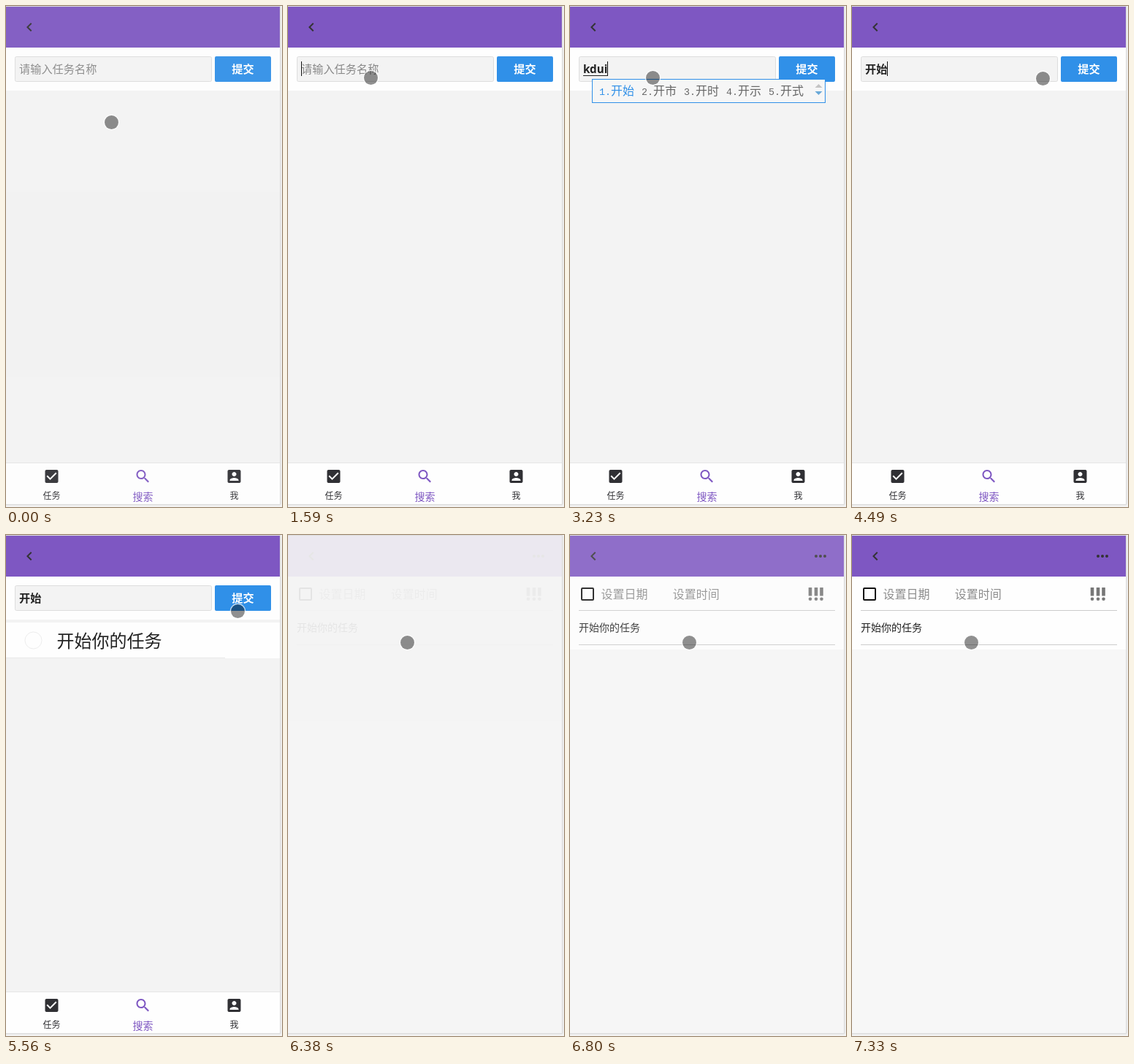
An HTML page for the animation above (7.99 s loop, 378 by 687 pixels).

```html
<!DOCTYPE html>
<html lang="zh">
<head>
<meta charset="utf-8">
<style>
  html, body { margin: 0; width: 100%; height: 100%; overflow: hidden; background: #f5f5f5; }
  svg { display: block; font: 15.2px "Open Sans", "Noto Sans CJK SC", "Noto Sans CJK", sans-serif; }
  .b { font-weight: bold; }
  .mid { text-anchor: middle; }
  .thin { font-weight: 300; }
  .line { stroke: #ccc; }
  .half { font: 13.33px "Liberation Mono", monospace; }
</style>
</head>
<body>
<svg width="378" height="687" viewBox="0 0 378 687">
  <defs>
    <filter id="soft" x="-5%" y="-5%" width="110%" height="110%"><feGaussianBlur stdDeviation="1.3"/></filter>
    <path id="back" d="M35.41 24.41L34 23l-6 6 6 6 1.41-1.41L30.83 29z" fill="#333"/>
  </defs>
  <rect x="-4" y="1" width="380" height="683" fill="#ccc" filter="url(#soft)"/>
  <path d="M0 .5H376M375.5 0V684M0 683.5H376" stroke="#dedede"/>
  <rect y="1" width="375" height="682" fill="#f4f4f4"/>

  <g id="search">
    <rect y="1" width="375" height="682" fill="#f3f3f3"/>
    <rect y="1" width="375" height="56" fill="#7e57c2"/>
    <use href="#back"/>
    <rect y="57" width="375" height="59" fill="#fefefe"/>
    <rect x="12.5" y="69.5" width="269" height="34" rx="2" fill="#f3f3f3" stroke="#ddd"/>
    <rect x="286" y="69" width="77" height="35" rx="2" fill="#3090e8"/>
    <text x="324.5" y="92.3" class="b mid" fill="#fff">提交</text>
    <text id="hint" x="18" y="92.3" fill="#888">请输入任务名称</text>
    <text id="typed" x="18" y="92.3" class="b" fill="#222"></text>
    <path id="under" stroke="#222"/>
    <path id="caret" stroke="#111"/>
    <g id="item">
      <rect y="120" width="375" height="49" fill="#fefefe"/>
      <path d="M0 168.5H300" stroke="#e9e9e9"/>
      <circle cx="37.5" cy="144.5" r="11.5" fill="none" stroke="#ededed"/>
      <text x="69.5" y="153.5" font-size="24" class="thin" fill="#222">开始你的任务</text>
    </g>
    <g id="popup">
      <rect id="frame" x="30.5" y="100.5" height="32" fill="#f6f6f6" stroke="#3090e8"/>
      <g id="words" font-size="16"></g>
      <g id="arrows"><path d="M-5 112l5-5 5 5z" fill="#c4c4c4"/><path d="M-5 117l5 5 5-5z" fill="#6aa9d8"/></g>
    </g>
    <rect y="626" width="375" height="1" fill="#e6e6e6"/>
    <rect y="627" width="375" height="56" fill="#fefefe"/>
    <g fill="#303034" class="mid" font-size="12">
      <path transform="translate(50.5 633)" d="M19 3H5c-1.11 0-2 .9-2 2v14c0 1.1.89 2 2 2h14c1.11 0 2-.9 2-2V5c0-1.1-.89-2-2-2zm-9 14l-5-5 1.41-1.41L10 14.17l7.59-7.59L19 8l-9 9z"/>
      <text x="62.5" y="676">任务</text>
      <path transform="translate(300.5 633)" d="M3 5v14c0 1.1.89 2 2 2h14c1.1 0 2-.9 2-2V5c0-1.1-.9-2-2-2H5c-1.11 0-2 .9-2 2zm12 4c0 1.66-1.34 3-3 3s-3-1.34-3-3 1.34-3 3-3 3 1.34 3 3zm-9 8c0-2 4-3.1 6-3.1s6 1.1 6 3.1v1H6v-1z"/>
      <text x="312.5" y="676">我</text>
    </g>
    <g fill="#7e57c2" class="mid" font-size="14">
      <path transform="translate(175.5 633)" d="M15.5 14h-.79l-.28-.27C15.41 12.59 16 11.11 16 9.5 16 5.91 13.09 3 9.5 3S3 5.91 3 9.5 5.91 16 9.5 16c1.61 0 3.09-.59 4.23-1.57l.27.28v.79l5 4.99L20.49 19l-4.99-5zm-6 0C7.01 14 5 11.99 5 9.5S7.01 5 9.5 5 14 7.01 14 9.5 11.99 14 9.5 14z"/>
      <text x="187.5" y="678.3">搜索</text>
    </g>
  </g>

  <g id="detail">
    <rect y="1" width="375" height="682" fill="#f7f7f7"/>
    <rect y="1" width="375" height="56" fill="#7e57c2"/>
    <use href="#back"/>
    <g fill="#333"><circle cx="337" cy="29" r="2"/><circle cx="343" cy="29" r="2"/><circle cx="349" cy="29" r="2"/></g>
    <rect y="57" width="375" height="100" fill="#fefefe"/>
    <rect x="16" y="73" width="16" height="16" rx="1" fill="none" stroke="#111" stroke-width="2"/>
    <g font-size="16" class="thin" fill="#8c8c8c">
      <text x="42.5" y="87">设置日期</text>
      <text x="140.8" y="87">设置时间</text>
    </g>
    <g fill="#777" id="marks"></g>
    <path class="line" d="M12 103.5H363M12 150.5H363"/>
    <text x="12" y="132.3" font-size="14" fill="#222">开始你的任务</text>
  </g>

  <g id="pointer">
    <circle r="10" fill="none" stroke="#fff" stroke-opacity=".7" stroke-width="1.5"/>
    <circle r="9.5" fill="#000" fill-opacity=".43"/>
  </g>
</svg>
<script>
const LOOP = 7990;
const $ = id => document.getElementById(id);
const show = (id, on) => $(id).setAttribute('display', on ? 'inline' : 'none');

// Each track lists [start ms, value...]; a value holds until the next start.
const pointer = [[0, 144, 159], [150, 113, 115], [300, 113, 107], [430, 113, 98],
  [4340, 164, 98], [4490, 261, 99], [4640, 310, 99], [4760, 325, 96], [4880, 329, 93],
  [5560, 317, 104], [5710, 243, 150], [5860, 200, 150], [5980, 166, 147], [6130, 163, 147]];
const searchFade = [[0, .94], [300, .97], [430, 1], [6380, 0]];
const detailFade = [[0, 0], [6380, .065], [6520, .3], [6640, .587], [6800, .85], [6940, .96], [7330, 1]];
const caret = [[0, 0], [570, 1], [1130, 0], [1590, 1], [2180, 0], [2580, 1], [3780, 0], [4340, 1], [4760, 0]];
const phrases = '开始 开市 开时 开示 开式';
const typing = [[0, '', ''], [2830, 'k', '可 看 开 快 k歌'], [2980, 'kd', '开 凯 慨 楷 揩'],
  [3105, 'kdu', phrases], [3230, 'kdui', phrases], [3380, '开始', '']];

const at = (track, t) => track.findLast(k => k[0] <= t).slice(1);

$('marks').innerHTML = [329, 337, 344.5].map(x =>
  `<rect x="${x - 2.3}" y="72" width="4.6" height="11.5" rx=".5"/><circle cx="${x}" cy="87.7" r="2.3"/>`).join('');

let shown = null;
function setText(text, list) {
  if (shown === text) return;
  shown = text;
  $('typed').textContent = text;
  const end = 18 + Math.round($('typed').getComputedTextLength());
  $('caret').setAttribute('d', `M${end + .5} 76V96`);
  $('under').setAttribute('d', `M18 95.5H${end}`);
  show('hint', !text);
  show('popup', list);
  show('under', list);
  if (!list) return;
  let x = 40;
  $('words').innerHTML = list.split(' ').map((word, i) => {
    const label = `${i + 1}.${word}`, left = x;
    for (const c of label) x += c < '\x7f' ? 8 : 16;
    x += 10;
    return `<text x="${left}" y="122.3" fill="${i ? '#666' : '#3090e8'}">` +
      label.replace(/[\w.]+/g, '<tspan class="half">$&</tspan>') + '</text>';
  }).join('');
  $('frame').setAttribute('width', x - 11);
  $('arrows').setAttribute('transform', `translate(${x + 10.5})`);
}

function draw(now) {
  const t = now % LOOP;
  setText(...at(typing, t));
  show('caret', at(caret, t)[0]);
  show('item', t >= 5030);
  $('search').setAttribute('opacity', at(searchFade, t)[0]);
  $('detail').setAttribute('opacity', at(detailFade, t)[0]);
  const [x, y] = at(pointer, t);
  $('pointer').setAttribute('transform', `translate(${x + .5} ${y + .5})`);
  requestAnimationFrame(draw);
}
const start = performance.now();
requestAnimationFrame(function tick() {
  draw(performance.now() - start);
});
</script>
</body>
</html>
```
